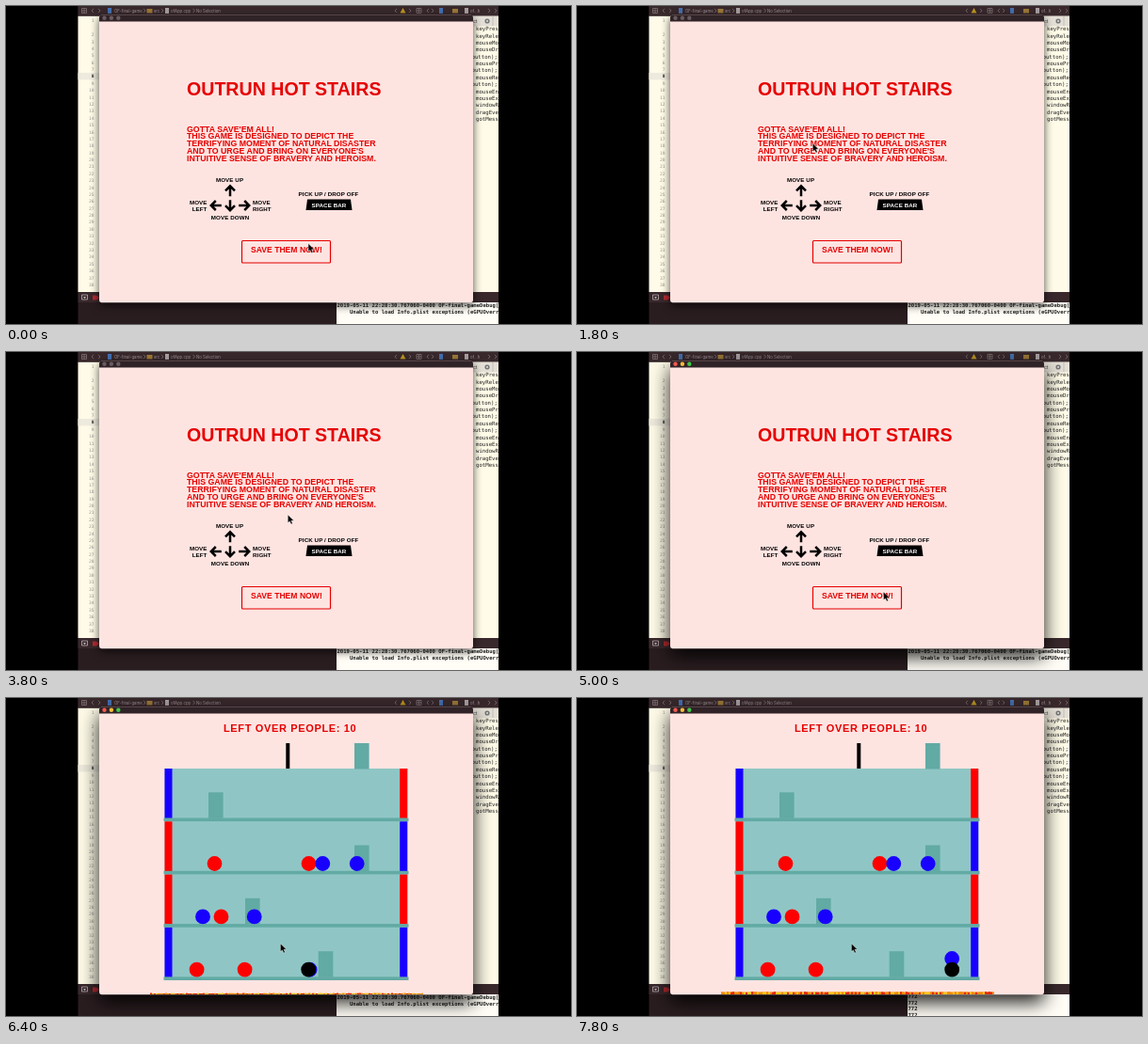
An HTML page that plays this animation: 600x338 px, repeating every 8000 ms.

```html
<!DOCTYPE html>
<html lang="en">
<head>
<meta charset="utf-8">
<title>Rescue game</title>
<style>
  html, body { margin: 0; width: 100%; height: 100%; overflow: hidden; background: #000; }
  svg { display: block; width: 100%; height: 100%; }
  text { white-space: pre; }
  .game { font-family: "Liberation Sans", Arial, sans-serif; font-weight: 700; }
  .code { font-family: "DejaVu Sans Mono", monospace; }
  .ui { font-family: Inter, sans-serif; }
</style>
</head>
<body>
<svg viewBox="0 0 600 338">
  <defs>
    <clipPath id="desktop"><rect x="76.5" width="446.5" height="338"/></clipPath>
    <clipPath id="content"><rect x="99" y="16" width="397" height="299"/></clipPath>
  </defs>
  <rect width="600" height="338"/>
  <g clip-path="url(#desktop)">
    <g id="editor"></g>
    <g id="console"></g>
    <g id="window"></g>
    <g clip-path="url(#content)">
      <g id="intro"></g>
      <g id="play"></g>
    </g>
    <path id="cursor" d="M0 0V8.6L2 6.9 3.5 10 5 9.3 3.6 6.3H6.4Z" stroke="#fff" stroke-width=".4"/>
  </g>
</svg>
<script>
const LOOP = 8000, STEP = 200;
const FOCUS_AT = 4600, PLAY_AT = 5200, PICK_AT = 6800;
const PINK = '#fee4e1', RED = '#f00', BLUE = '#1800ff', INK = '#e60000';
const TEAL = '#8fc6c5', DARK_TEAL = '#62aaa4', CHROME = '#38282c', CREAM = '#fffbe8', ICON = '#a99da2';

const el = id => document.getElementById(id);
const rect = (x, y, w, h, fill, more = '') =>
  `<rect x="${x}" y="${y}" width="${w}" height="${h}" fill="${fill}" ${more}/>`;
const disc = (x, y, r, fill, more = '') =>
  `<circle cx="${x}" cy="${y}" r="${r}" fill="${fill}" ${more}/>`;
const line = (d, stroke, width, more = '') =>
  `<path d="${d}" fill="none" stroke="${stroke}" stroke-width="${width}" ${more}/>`;
const label = (kind, x, y, size, fill, string, more = '') =>
  `<text class="${kind}" x="${x}" y="${y}" font-size="${size}" fill="${fill}" ${more}>${string}</text>`;
const each = (list, draw) => list.map(draw).join('');

function drawEditor() {
  const numbers = Array.from({ length: 38 }, (_, i) => i + 1);
  const code = ['keyPres', 'keyRele', 'mouseMo', 'mouseDr', 'button);', 'mousePr', 'button);',
    'mouseRe', 'button);', 'mouseEn', 'mouseEx', 'windowR', 'dragEve', 'gotMess'];
  const grid = x => line(`M${x} 2.5h5v5h-5zM${x + 2.5} 2.5v5M${x} 5h5`, ICON, .7);
  const next = x => line(`M${x} 2.8l2 2.2-2 2.2`, ICON, .7);
  const back = x => line(`M${x} 2.8l-2 2.2 2 2.2`, ICON, .7);
  const file = (x, fill) => rect(x, 2, 4, 6, fill);
  const folder = x => rect(x, 3, 6, 4.5, '#c59a3c');
  const crumb = (x, s) => label('ui', x, 6.7, 4.3, '#c8bec2', s);
  return rect(76, 0, 447, 338, '#2a1d20') + rect(76, 10.6, 447, 293.4, CREAM)
    + rect(76, 0, 447, 10.6, CHROME) + rect(76, 304, 447, 11, CHROME)
    + rect(76, 71, 23, 7.4, '#eeeadd')
    + each(numbers, n => label('code', 93.5, n === 1 ? 17 : 32.2 + (n - 2) * 7.38, 4.6,
        n === 8 ? '#222' : '#999a94', n, `text-anchor="end" ${n === 8 ? 'font-weight="700"' : ''}`))
    + rect(496, 10.6, 27, 11, '#e4dfd6') + label('ui', 496, 18, 5, '#444', 'ct')
    + disc(511, 16, 2.6, '#777') + line('M510 15l2 2m0-2l-2 2', '#fff', .6) + line('M517 11v10', '#aaa', .6)
    + each(code, (s, i) => label('code', s[0] === 'b' ? 494.5 : 499, 26.2 + i * 7.38, 5.7, '#222', s))
    + '<g opacity=".7">'
    + grid(80.5) + back(93) + next(98)
    + file(108, '#4a8ee8') + crumb(115, 'OF-final-game')
    + folder(149.5) + crumb(157, 'src')
    + file(169, '#d8d2d4') + crumb(175, 'ofApp.cpp') + crumb(202, 'No Selection')
    + each([146, 165, 198.5], next)
    + back(415) + '<path d="M421.5 2l3 5.6h-6z" fill="#f5c51c"/>' + next(428)
    + grid(436) + back(449) + next(452)
    + file(460, '#4a8ee8') + folder(474) + file(487, '#d8d2d4')
    + crumb(493, 'of...h') + next(512) + next(519)
    + '</g>'
    + line('M80.5 307h6v5h-6z', '#c8bec2', .7) + '<path d="M82 309h3l-1.5 2z" fill="#c8bec2"/>'
    + '<path d="M92 307.5h4l3 2.5-3 2.5h-4z" fill="#b52a31"/>';
}

function drawConsole(counting) {
  const text = (x, y, s) => label('code', x, y, 5.6, '#222', s, 'font-weight="700"');
  const output = counting
    ? each([319, 325.6, 332.2, 338.8], y => text(351.5, y, '772'))
    : text(351.5, 320.3, '2019-05-11 22:28:30.767060-0400 OF-final-gameDebug[')
      + text(365, 327, 'Unable to load Info.plist exceptions (eGPUOverr');
  return rect(351, 315, 172, 23, '#fffdf5') + output;
}

function drawWindow(focused) {
  const lamps = focused ? ['#f4574f', '#f6bd3a', '#41c648'] : ['#6a5b61', '#6a5b61', '#6a5b61'];
  const shadow = focused ? '0 8px 10px rgba(0,0,0,.9)' : '0 3px 5px rgba(0,0,0,.7)';
  return `<g style="filter:drop-shadow(${shadow})">${rect(99, 9.8, 397, 305.4, PINK, 'rx="2.4"')}</g>`
    + '<path d="M99 16.5V12q0-2.2 2.2-2.2H493.8q2.2 0 2.2 2.2V16.5z" fill="#302327"/>'
    + each(lamps, (c, i) => disc(104.5 + i * 7.4, 12.7, 2.2, c));
}

function drawIntro() {
  const story = ["GOTTA SAVE'EM ALL!", 'THIS GAME IS DESIGNED TO DEPICT THE',
    'TERRIFYING MOMENT OF NATURAL DISASTER', "AND TO URGE AND BRING ON EVERYONE'S",
    'INTUITIVE SENSE OF BRAVERY AND HEROISM.'];
  const hint = (x, y, s, anchor = 'start', fill = '#000') =>
    label('game', x, y, 6.2, fill, s, `text-anchor="${anchor}" letter-spacing=".1"`);
  const arrow = (x, y, turn) => line('M-5.8 0H5M.2-5L5.2 0 .2 5', '#000', 2.5,
    `transform="translate(${x} ${y}) rotate(${turn})"`);
  return label('game', 192, 95, 19.6, INK, 'OUTRUN HOT STAIRS')
    + each(story, (s, i) => label('game', 192, 133.6 + i * 7.75, 8.8, INK, s))
    + hint(237.5, 186.5, 'MOVE UP', 'middle') + hint(238, 227, 'MOVE DOWN', 'middle')
    + hint(213.5, 211.2, 'MOVE', 'end') + hint(213.5, 218.2, 'LEFT', 'end')
    + hint(262, 211.2, 'MOVE') + hint(262, 218.2, 'RIGHT')
    + arrow(238, 196.5, -90) + arrow(238, 212, 90) + arrow(223, 212, 180) + arrow(253, 212, 0)
    + hint(342.5, 202, 'PICK UP / DROP OFF', 'middle')
    + '<path d="M320 205.5h46l1.5 11.5h-49z"/>' + hint(343, 213.6, 'SPACE BAR', 'middle', '#fff')
    + rect(250.5, 249.5, 94, 23.5, 'none', `rx="1" stroke="${INK}" stroke-width="1.2"`)
    + label('game', 260, 262, 8.6, INK, 'SAVE THEM NOW!');
}

function drawPlay() {
  const floorY = i => 75 + i * 56.3;
  const left = [BLUE, RED, RED, BLUE], right = [RED, BLUE, RED, BLUE];
  const doors = [[370, 48], [215, 100.3], [370, 156.5], [254, 212.8], [331.7, 269.2]];
  const people = [[221.5, 176, RED], [321.5, 176, RED], [336.3, 176, BLUE], [372.7, 176, BLUE],
    [209, 232.4, BLUE], [228.5, 232.4, RED], [263.7, 232.4, BLUE],
    [202.6, 288.7, RED], [253.6, 288.7, RED]];
  return label('game', 231, 36.3, 11, INK, 'LEFT OVER PEOPLE: 10', 'letter-spacing=".65"')
    + rect(168.5, 75, 258, 224, TEAL) + rect(297.3, 48, 4, 27, '#000')
    + each(doors, ([x, y]) => rect(x, y, 15.6, 27.5, DARK_TEAL))
    + each(left, (c, i) => rect(168.5, floorY(i), 8, 53, c) + rect(418.2, floorY(i), 8, 53, right[i])
        + rect(167.5, floorY(i) + 52.5, 260, 3.6, DARK_TEAL))
    + each(people, ([x, y, c]) => disc(x, y, 7.9, c))
    + disc(322.5, 288.7, 7.9, BLUE, 'id="friend"') + disc(297.4, 288.7, 7.9, '#000', 'id="hero"')
    + '<g id="lava"></g>';
}

const random = n => { const v = Math.sin(n * 12.9898) * 43758.5453; return v - Math.floor(v); };

function drawLava(t) {
  const height = (t - PLAY_AT) / 1000;
  if (height <= 0) return '';
  const colors = ['#e62a00', '#f58a00', '#ffc61a'];
  const flecks = Array.from({ length: 145 }, (_, i) => i);
  return rect(153, 315.3 - height, 290, height, '#f07a08')
    + each(flecks, i => {
      const seed = i + t / STEP * 31;
      const h = Math.max(.2, height + random(seed) * .8 - .5);
      return rect(153 + i * 2, (315 - h).toFixed(2), 2, h.toFixed(2), colors[Math.floor(random(seed + 500) * 3)]);
    });
}

// Keys are [time, ...values]; values ease between neighbours.
function track(keys, t, ease = u => u) {
  const next = keys.findIndex(k => k[0] > t);
  if (next < 0) return keys[keys.length - 1].slice(1);
  const a = keys[next - 1], b = keys[next];
  const u = ease((t - a[0]) / (b[0] - a[0]));
  return a.slice(1).map((v, i) => v + (b[i + 1] - v) * u);
}
const smooth = u => u * u * (3 - 2 * u);
const cursorPath = [[0, 321, 252.5], [400, 321, 252.5], [1600, 250.3, 146], [2000, 250.3, 146],
  [3600, 299.3, 173], [3800, 299.3, 173], [4800, 325.5, 255], [5000, 325.5, 255], [5200, 291.4, 261]];
const heroPath = [[5200, 297.4], [5600, 297.4], [6200, 321.2], [6800, 321.2], [7600, 398.2]];

el('editor').innerHTML = drawEditor();
el('intro').innerHTML = drawIntro();
el('play').innerHTML = drawPlay();

let shown = -1;
function frame() {
  const t = Math.floor(performance.now() % LOOP / STEP) * STEP;
  if (t !== shown) {
    shown = t;
    const playing = t >= PLAY_AT, carrying = t >= PICK_AT;
    const [x, y] = track(cursorPath, t, smooth);
    const heroX = playing ? track(heroPath, t)[0] : heroPath[0][1];
    el('console').innerHTML = drawConsole(carrying);
    el('window').innerHTML = drawWindow(t >= FOCUS_AT);
    el('intro').style.display = playing ? 'none' : '';
    el('play').style.display = playing ? '' : 'none';
    el('hero').setAttribute('cx', heroX);
    el('friend').setAttribute('cx', carrying ? heroX : 322.5);
    el('friend').setAttribute('cy', carrying ? 277 : 288.7);
    el('lava').innerHTML = drawLava(t);
    el('cursor').setAttribute('transform', `translate(${x} ${y})`);
  }
  requestAnimationFrame(frame);
}
frame();
</script>
</body>
</html>
```
